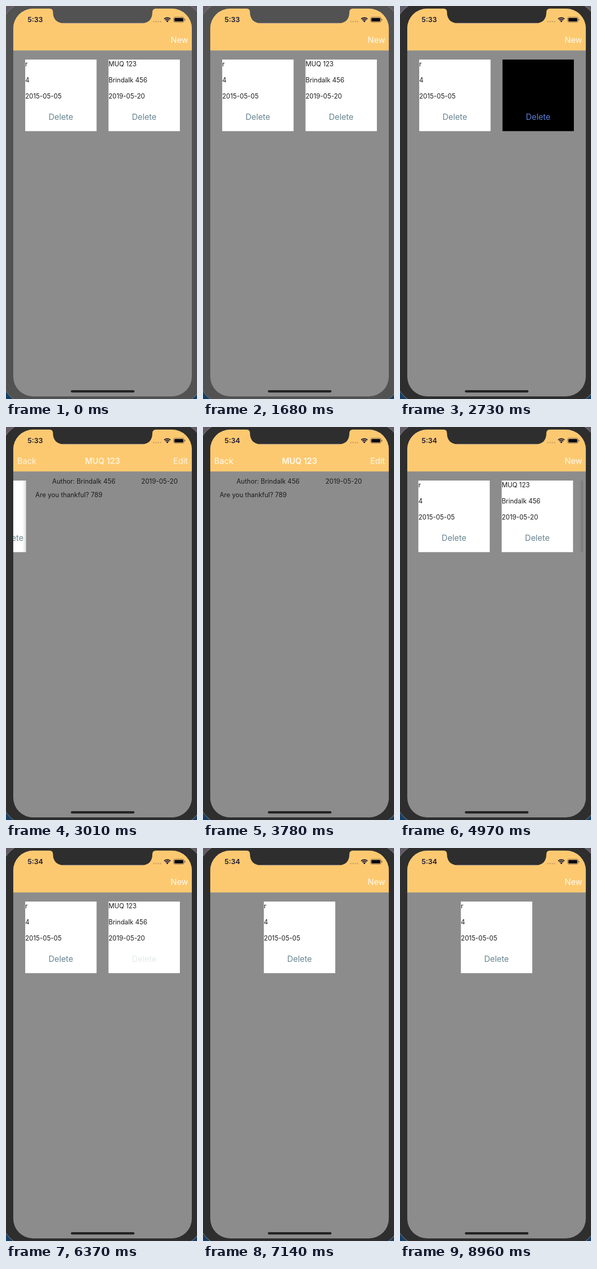
Animation of 368 by 756 pixels, one loop 9030 ms. Source, as an HTML page with a canvas:

```html
<!DOCTYPE html>
<html lang="en">
<head>
<meta charset="utf-8">
<title>Notes app</title>
<style>
  html, body { margin: 0; width: 100%; height: 100%; overflow: hidden; }
  canvas { display: block; }
</style>
</head>
<body>
<canvas id="stage" width="368" height="756"></canvas>
<script>
const ctx = document.getElementById('stage').getContext('2d');
const LOOP = 9030;
const SCREEN = { x: 14, y: 5, w: 344, h: 746 };
const BAR_BOTTOM = 85.5;
const ORANGE = '#fdc970', GRAY = '#8c8c8c', INK = '#1c1c1c', NAVY = '#1a1733';
const NOTES = [
  { title: 'r', author: '4', date: '2015-05-05' },
  { title: 'MUQ 123', author: 'Brindalk 456', date: '2019-05-20' }
];

const clamp = v => Math.max(0, Math.min(1, v));
const ramp = (t, from, to) => clamp((t - from) / (to - from));
const smooth = p => p * p * (3 - 2 * p);
const between = (t, from, to) => t >= from && t < to;

// Critically damped spring, settles in about half a second
function spring(ms) {
  if (ms <= 0) return 0;
  const u = ms * 0.0165;
  return ms > 600 ? 1 : 1 - (1 + u) * Math.exp(-u);
}

function text(str, x, y, { size = 12.5, weight = 400, color = INK, align = 'left', alpha = 1 } = {}) {
  if (alpha <= 0) return;
  ctx.save();
  ctx.globalAlpha *= alpha;
  ctx.font = `${weight} ${size}px Inter, sans-serif`;
  ctx.textAlign = align;
  ctx.fillStyle = color;
  ctx.fillText(str, x, y);
  ctx.restore();
}

function rect(x, y, w, h, color) {
  ctx.fillStyle = color;
  ctx.fillRect(x, y, w, h);
}

function roundRect(x, y, w, h, r, color) {
  ctx.fillStyle = color;
  ctx.beginPath();
  ctx.roundRect(x, y, w, h, r);
  ctx.fill();
}

function drawCard(note, x, { selected = false, buttonAlpha = 1, alpha = 1 } = {}) {
  ctx.save();
  ctx.globalAlpha = alpha;
  rect(x, 103, 137.5, 137.7, selected ? '#000' : '#fff');
  if (!selected) {
    [note.title, note.author, note.date].forEach((line, i) => text(line, x, 115.5 + i * 31));
  }
  text('Delete', x + 68.7, 219, {
    size: 15.7, align: 'center', alpha: buttonAlpha, color: selected ? '#5c80d8' : '#678490'
  });
  ctx.restore();
}

function drawList(t, shift) {
  const removal = smooth(ramp(t, 6820, 7120));
  const pressed = ramp(t, 6140, 6200) * (1 - ramp(t, 6390, 6680));
  drawCard(NOTES[0], 37 + 80.3 * removal + shift);
  if (removal < 1) {
    drawCard(NOTES[1], 197.5 + shift, {
      selected: between(t, 2660, 3300),
      buttonAlpha: 1 - 0.82 * pressed,
      alpha: 1 - removal
    });
  }
}

function drawDetail(offset) {
  const left = SCREEN.x + offset;
  const shadow = ctx.createLinearGradient(left - 7, 0, left, 0);
  shadow.addColorStop(0, 'rgba(0,0,0,0)');
  shadow.addColorStop(1, 'rgba(0,0,0,.13)');
  rect(left - 7, 103, 7, 137.7, shadow);
  rect(left, BAR_BOTTOM, SCREEN.w, 670, GRAY);
  const { author, date } = NOTES[1];
  text('Author: ' + author, 64.5 + offset, 108.5);
  text(date, 236 + offset, 108.5);
  text('Are you thankful? 789', 32 + offset, 134.5);
}

function drawBar(t, shown) {
  rect(SCREEN.x, SCREEN.y, SCREEN.w, BAR_BOTTOM - SCREEN.y, ORANGE);
  const item = { size: 15.8, color: '#fffaf0' };
  const fade = shown * shown;
  const backPressed = between(t, 4480, 5200) ? 0.2 : 1;
  text('Back', 21.5, 71.3, { ...item, alpha: fade * backPressed });
  text(NOTES[1].title, 186, 71, { ...item, size: 15.5, weight: 600, align: 'center', alpha: fade });
  text('Edit', 350.5, 71.3, { ...item, align: 'right', alpha: fade });
  text('New', 351, 71.3, { ...item, align: 'right', alpha: clamp((0.9 - shown) * 2.9) });
}

function drawStatus(t) {
  text(between(t, 0, 3710) ? '5:33' : '5:34', 41.5, 31, { size: 13.4, weight: 600, color: NAVY });
  for (let i = 0; i < 4; i++) roundRect(283.5 + i * 4.3, 28.6, 2.8, 2.8, 1.4, '#cda465');

  ctx.strokeStyle = NAVY;
  ctx.lineWidth = 2;
  for (const r of [5.4, 8.6]) {
    ctx.beginPath();
    ctx.arc(310.8, 31, r, -Math.PI * 0.75, -Math.PI * 0.25);
    ctx.stroke();
  }
  ctx.fillStyle = NAVY;
  ctx.beginPath();
  ctx.moveTo(310.8, 31.5);
  ctx.arc(310.8, 31, 3.2, -Math.PI * 0.75, -Math.PI * 0.25);
  ctx.fill();

  ctx.strokeStyle = '#80694f';
  ctx.lineWidth = 1;
  ctx.beginPath();
  ctx.roundRect(322.9, 21.4, 20.2, 9.8, 2.8);
  ctx.stroke();
  roundRect(324.4, 22.9, 17.2, 6.8, 1.5, '#080812');
  roundRect(344, 24.6, 1.4, 3.4, 0.7, '#80694f');
}

function drawNotch(color) {
  ctx.fillStyle = color;
  ctx.beginPath();
  ctx.moveTo(84, 4);
  ctx.lineTo(84, 5);
  ctx.quadraticCurveTo(90.5, 5, 90.5, 12);
  ctx.bezierCurveTo(90.5, 25, 98, 33, 111, 33);
  ctx.lineTo(262, 33);
  ctx.bezierCurveTo(275, 33, 282, 25, 282, 12);
  ctx.quadraticCurveTo(282, 5, 289, 5);
  ctx.lineTo(289, 4);
  ctx.fill();
  rect(109, 32.6, 155, 0.8, '#a99cb0');
}

function drawBody(color) {
  rect(0, 0, 368, 378, '#625b66');
  rect(0, 378, 368, 378, '#163f66');
  roundRect(-9, -9, 390, 775, 54, '#77777a');
  roundRect(-8, -8, 388, 773, 53, color);
}

function draw(t) {
  const shown = t < 4000 ? spring(t - 2750) : 1 - spring(t - 4600);
  const bezel = t < 2100 ? '#525252' : '#2e2e2e';
  drawBody(bezel);

  ctx.save();
  ctx.beginPath();
  ctx.roundRect(SCREEN.x, SCREEN.y, SCREEN.w, SCREEN.h, 38);
  ctx.clip();
  rect(SCREEN.x, SCREEN.y, SCREEN.w, SCREEN.h, GRAY);
  drawList(t, -0.3 * SCREEN.w * shown);
  if (shown > 0) drawDetail(SCREEN.w * (1 - shown));
  drawBar(t, shown);
  drawStatus(t);
  roundRect(125, 739, 122.5, 4.6, 2.3, '#222');
  ctx.restore();

  drawNotch(bezel);
}

function tick() {
  draw(performance.now() % LOOP);
  requestAnimationFrame(tick);
}
tick();
</script>
</body>
</html>
```
